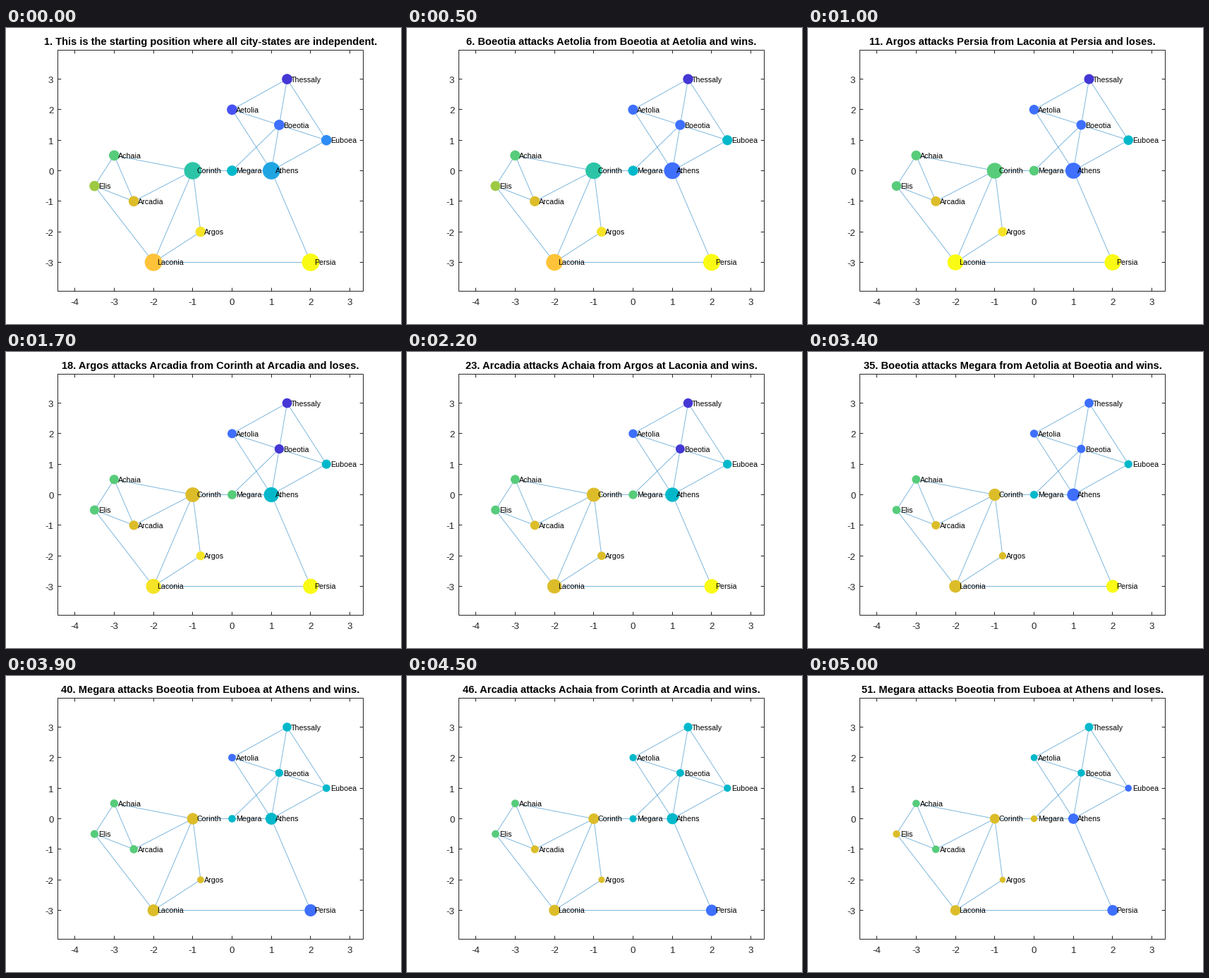
A matplotlib script for the animation above (7000 ms loop, 560 px wide and 420 px high).

```python
import matplotlib.pyplot as plt
from matplotlib.animation import FuncAnimation

plt.rcParams["font.family"] = "Liberation Sans"
PT = 0.72  # points per pixel at 100 dpi
W, H = 560, 420
LEFT, RIGHT, TOP, BOTTOM = 73.5, 506.5, 31.5, 373.5
DARK = "#262626"

# key: name, x, y, first and last diameter, colour
CITIES = {
    "Th": ("Thessaly", 1.4, 3, 14.7, 12, "#4537d5"),
    "Ae": ("Aetolia", 0, 2, 14.7, 9.7, "#4852f4"),
    "Bo": ("Boeotia", 1.2, 1.5, 14.7, 10.5, "#3e6fff"),
    "Eu": ("Euboea", 2.4, 1, 14.7, 9.7, "#2d8cf3"),
    "At": ("Athens", 1, 0, 24.7, 14.7, "#20a5e3"),
    "Me": ("Megara", 0, 0, 14.7, 9.5, "#01b8ca"),
    "Co": ("Corinth", -1, 0, 24.5, 14, "#2cc4a7"),
    "Ac": ("Achaia", -3, 0.5, 14.7, 10.5, "#57cc7a"),
    "El": ("Elis", -3.5, -0.5, 14.5, 10.3, "#9dc943"),
    "Ar": ("Arcadia", -2.5, -1, 14.7, 10.7, "#dcbd29"),
    "La": ("Laconia", -2, -3, 24.7, 14.7, "#fec338"),
    "Ag": ("Argos", -0.8, -2, 14.5, 8.5, "#f5e327"),
    "Pe": ("Persia", 2, -3, 24.9, 15.2, "#f9fb15"),
}
ROADS = """ThAe ThBo ThEu AeBo AeAt BoEu BoAt BoMe EuAt MeAt CoMe CoAc CoAr
CoAg CoLa AcEl AcAr ElAr ElLa AgLa LaPe AtPe""".split()
# attacking city, attacked city, result
BATTLES = """
PeAt+ MeAt+ AtEu+ BoAt+ BoAe+ AcEl+ AcCo+ CoMe+ AgLa+ LaPe-
BoTh- AtMe+ CoMe+ EuAt+ AgLa+ LaCo+ CoAr- CoLa+ AgLa+ ElLa+
CoAg+ AgLa+ CoMe+ AtMe+ AeBo+ BoTh+ EuBo+ PeAt+ BoAe+ ThAe+
AeAt+ ElLa+ CoLa+ AeBo+ AtPe+ EuBo+ AcAr+ BoTh+ EuAt+ ThAe+
PeAt+ ElLa+ CoLa+ BoAt+ CoAr+ LaEl+ AcAr+ CoMe+ PeAt+ EuAt-
""".split()
LAST = len(BATTLES)


def px(x):
    return 320.5 + 55.72 * x


def py(y):
    return 202.5 - 43.33 * y


def play():
    """Return the title and the owner of each city after every battle."""
    owner = {key: key for key in CITIES}
    steps = [("1. This is the starting position where all "
              "city-states are independent.", dict(owner))]
    for number, battle in enumerate(BATTLES, 2):
        a, b, won = battle[:2], battle[2:4], battle[4] == "+"
        names = [CITIES[k][0] for k in (owner[a], owner[b], a, b)]
        title = "{}. {} attacks {} from {} at {} and {}.".format(
            number, *names, "wins" if won else "loses")
        if won:
            owner[b] = owner[a]
        else:
            owner[a] = owner[b]
        steps.append((title, dict(owner)))
    return steps


STEPS = play()

fig = plt.figure(figsize=(5.6, 4.2), dpi=100, facecolor="white")
ax = fig.add_axes([0, 0, 1, 1])
ax.set_xlim(0, W)
ax.set_ylim(H, 0)
ax.axis("off")


def line(xs, ys, color=DARK, **kw):
    # Coordinates already sit on pixel centres, so snapping is off.
    ax.plot(xs, ys, color=color, lw=PT, snap=False, **kw)


def label(x, y, text, size, **kw):
    return ax.text(x, y, text, fontsize=size * PT, va="baseline", **kw)


for road in ROADS:
    (_, x1, y1, *_), (_, x2, y2, *_) = CITIES[road[:2]], CITIES[road[2:]]
    line([px(x1), px(x2)], [py(y1), py(y2)], "#0072bd", alpha=0.5, zorder=1)

line([LEFT, RIGHT, RIGHT, LEFT, LEFT], [TOP, TOP, BOTTOM, BOTTOM, TOP],
     solid_joinstyle="miter")
for v in range(-4, 4):
    x = int(px(v)) + 0.5
    line([x, x], [BOTTOM, BOTTOM - 4.3])
    line([x, x], [TOP, TOP + 4.3])
    label(px(v), 393, str(v), 13.33, ha="center", color=DARK)
for v in range(-3, 4):
    y = int(py(v)) + 0.5
    line([LEFT, LEFT + 4.3], [y, y])
    line([RIGHT, RIGHT - 4.3], [y, y])
    label(67.5, y + 5.6, str(v), 13.33, ha="right", color=DARK)

nodes = ax.scatter([px(c[1]) for c in CITIES.values()],
                   [py(c[2]) for c in CITIES.values()],
                   s=100, linewidths=0, zorder=3, snap=False)
for name, x, y, *_ in CITIES.values():
    label(px(x) + 5.5, py(y) + 4, name, 10.67, color="black", zorder=4)
title = label((LEFT + RIGHT) / 2, 24, "", 14.67, ha="center",
              weight="bold", color="black")


def update(i):
    step = min(i, LAST)
    text, owner = STEPS[step]
    title.set_text(text)
    nodes.set_facecolor([CITIES[owner[k]][5] for k in CITIES])
    nodes.set_sizes([(PT * (d0 + (d1 - d0) * step / LAST)) ** 2
                     for _, _, _, d0, d1, _ in CITIES.values()], fig.dpi)
    return nodes, title


anim = FuncAnimation(fig, update, frames=70, interval=100, repeat=True,
                     repeat_delay=0, blit=False)
plt.show()
```
